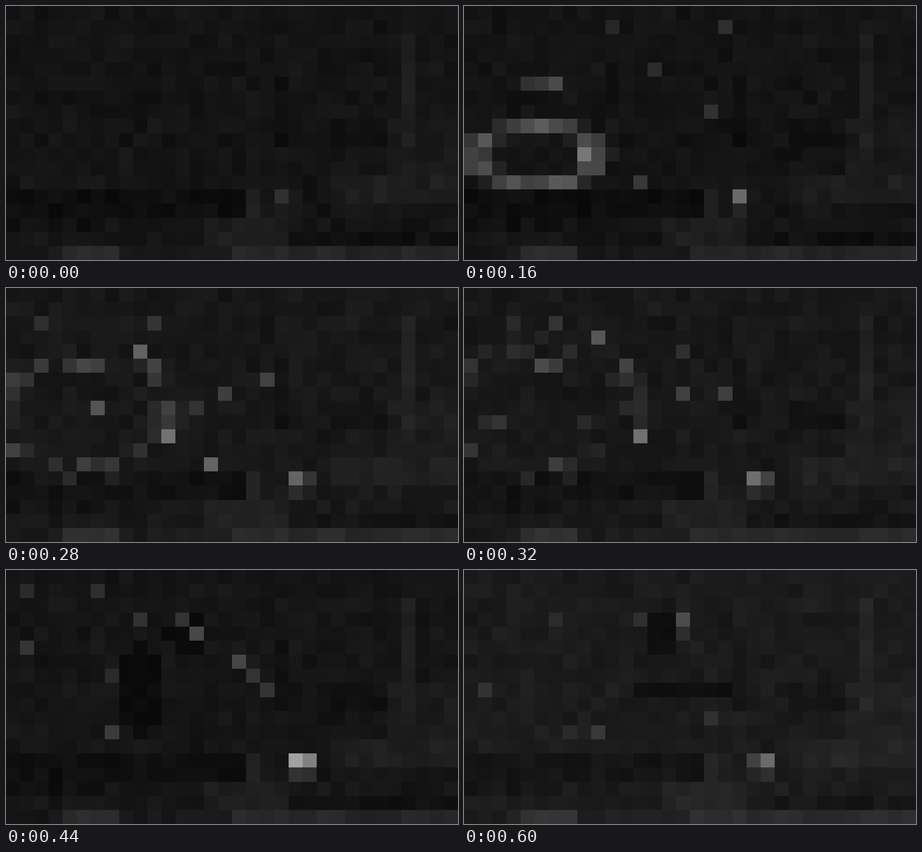
Animation of 998x561 px, one loop 0.64 s. Source, as an HTML page with a canvas:

```html
<!DOCTYPE html>
<html lang="en">
<head>
<meta charset="utf-8">
<title>Blocks in the dark</title>
<style>
  html, body { margin: 0; width: 100%; height: 100%; overflow: hidden; background: #000; }
  canvas { display: block; width: 998px; height: 561px; }
</style>
</head>
<body>
<canvas id="stage" width="998" height="561"></canvas>
<script>
const COLS = 32, ROWS = 18, STEP = 40, STEPS = 16;
const ctx = document.getElementById('stage').getContext('2d');
const edgeX = c => Math.round(c * 998 / COLS);
const edgeY = r => Math.round(r * 561 / ROWS);

// Repeatable noise from -1 to 1 for a cell and a seed.
function noise(x, y, seed) {
  let h = Math.imul(x + 11, 374761393) ^ Math.imul(y + 7, 668265263) ^ Math.imul(seed + 3, 974634777);
  h = Math.imul(h ^ (h >>> 13), 1274126177);
  h = Math.imul(h ^ (h >>> 16), 2246822519);
  return ((h ^ (h >>> 15)) >>> 0) / 2147483648 - 1;
}

const mix = (a, b, p) => a + (b - a) * p;

// Reads keys [step, ...values] at a step; holds the end values outside.
function track(keys, t) {
  const i = keys.findIndex(k => k[0] >= t);
  if (i === 0) return keys[0].slice(1);
  if (i < 0) return keys[keys.length - 1].slice(1);
  const a = keys[i - 1], b = keys[i], p = (t - a[0]) / (b[0] - a[0]);
  return a.slice(1).map((v, n) => mix(v, b[n + 1], p));
}

function eachCell(draw) {
  for (let y = 0; y < ROWS; y++)
    for (let x = 0; x < COLS; x++) draw(x, y, y * COLS + x);
}

// Still scenery: a dim wall, a post, the road and a paler kerb.
const scene = new Float32Array(COLS * ROWS).fill(21);
function band(x, y, w, h, level) {
  for (let r = y; r < y + h; r++) scene.fill(level, r * COLS + x, r * COLS + x + w);
}
band(27, 8, 5, 4, 26);
band(28, 2, 1, 8, 31);
band(19, 5, 1, 5, 16);
band(22, 8, 5, 2, 18);
band(23, 12, 9, 2, 30);
band(0, 13, 17, 2, 15);
band(17, 13, 1, 2, 30);
band(0, 15, 7, 1, 16);
band(14, 15, 6, 2, 30);
band(20, 16, 12, 1, 17);
band(0, 17, 16, 1, 24);
band(4, 17, 4, 1, 43);
band(16, 17, 16, 1, 38);
eachCell((x, y, i) => { scene[i] += 4 * noise(x, y, 40); });

const exposure = [[4, -1], [7, 3], [9, 3], [11, 0], [13, -2], [14, 6]];

// Step, column, power.
const lamp = [[0, 19, 26], [4, 19, 84], [7, 20.3, 105], [9, 20.4, 155], [11, 20.45, 245], [13, 21, 118], [15, 20.7, 122]];

// Step, centre, radii of the smoke and of the wisp above it.
const smoke = [[9, 6.8, 8.5, 1.7, 3], [11, 9, 8, 1.8, 3], [13, 11, 7.2, 2, 3.2], [15, 15, 8, 3.6, .7]];
const wisp = [[9, 11.5, 4, 1.2, 1.5], [15, 13.5, 4.2, 1.2, 1.6]];

// Main embers as start and end: step, x, y, level.
const embers = [
  [[4, 5, 5, 55], [9, 5, 5, 80]],
  [[4, 6, 5, 75], [9, 6, 5, 55]],
  [[4, 8, 10, 120], [8, 12, 10, 112]],
  [[4, 12, 12, 56], [7, 14, 12, 100]],
  [[4, 6, 8, 74], [7, 6, 8, 84]],
  [[7, 9, 3.6, 98], [11, 9, 3, 50]],
  [[7, 15, 7, 62], [11, 16, 6, 70]],
  [[7, 18, 6, 66], [11, 18, 8, 52]],
  [[7, 10, 5, 66], [15, 15, 3, 76]],
  [[7, 5, 11.8, 62], [15, 9, 11, 56]]
];

function render(t) {
  const light = new Float32Array(COLS * ROWS);
  const [lift] = track(exposure, t);
  eachCell((x, y, i) => { light[i] = scene[i] + lift + 2.5 * noise(x, y, t); });

  const glow = (x, y, level) => {
    const i = Math.round(y) * COLS + Math.round(x);
    light[i] = Math.max(light[i], level);
  };

  if (t >= 9)
    for (const keys of [smoke, wisp]) {
      const [cx, cy, rx, ry] = track(keys, t);
      eachCell((x, y, i) => {
        if (Math.hypot((x - cx) / rx, (y - cy) / ry) <= 1) light[i] *= .55;
      });
    }

  // The ring of fire widens, thins and breaks apart.
  if (t > 1 && t < 9) {
    const age = t - 4, broken = Math.max(0, age) * .3;
    const cx = 4.6 + age * .1, cy = 10.1 - age * .5;
    const rx = 4.3 + age * .6, ry = 2.1 + age * .6;
    const power = 88 * (1 - Math.abs(age) * .12);
    eachCell((x, y) => {
      const off = Math.abs(Math.hypot((x - cx) / rx, (y - cy) / ry) - 1);
      const grain = noise(x, y, 5);
      if (off < .3 && grain > broken - 1)
        glow(x, y, power * (1 - off / .4) * (1 + .2 * grain));
    });
  }

  for (const [from, to] of embers)
    if (t >= from[0] && t <= to[0]) glow(...track([from, to], t));

  // Short-lived sparks, mostly on the left.
  for (let n = 0; t > 3 && n < 6; n++) {
    const birth = t - n % 2;
    const x = 18 * (noise(n, birth, 8) + 1) / 2;
    const y = 6.5 + 5.5 * noise(n, birth, 9);
    glow(x, y, 46 + 8 * noise(n, birth, 10));
  }

  const [column, power] = track(lamp, t);
  for (let x = 19; x < 23; x++) {
    const shine = power * Math.max(0, 1 - Math.abs(x - column));
    light[13 * COLS + x] += shine;
    light[14 * COLS + x] += shine * .2;
  }

  eachCell((x, y, i) => {
    const v = Math.round(Math.max(7, light[i]));
    ctx.fillStyle = `rgb(${v},${v},${v})`;
    ctx.fillRect(edgeX(x), edgeY(y), edgeX(x + 1) - edgeX(x), edgeY(y + 1) - edgeY(y));
  });
}

const start = performance.now();
let shown = -1;
function tick() {
  const step = Math.floor((performance.now() - start) / STEP) % STEPS;
  if (step !== shown) render(shown = step);
  requestAnimationFrame(tick);
}
tick();
</script>
</body>
</html>
```
